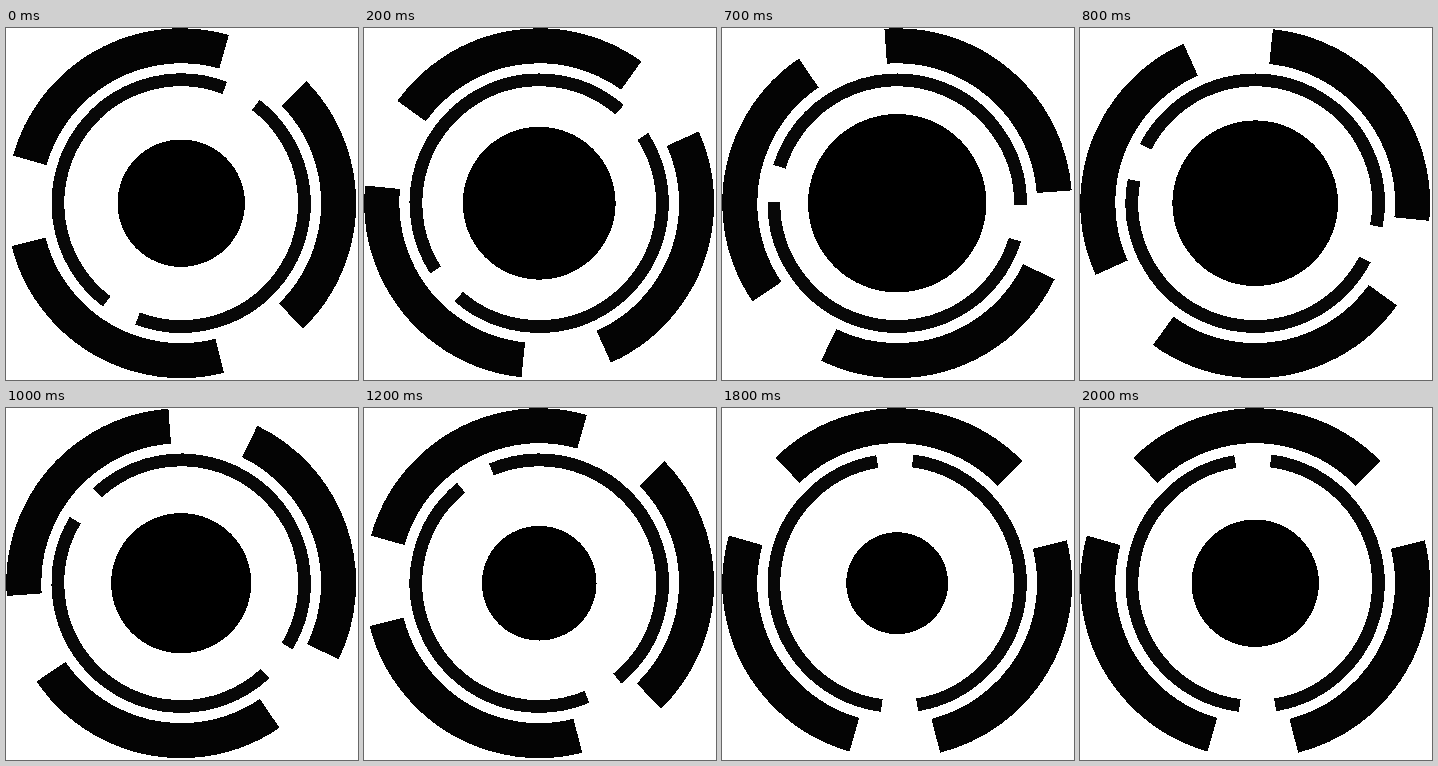
An HTML page that plays this animation: 352x352 px, repeating every 2100 ms.

```html
<!DOCTYPE html>
<html lang="en">
<head>
<meta charset="utf-8">
<title>Rotating rings</title>
<style>
html, body { margin: 0; width: 100%; height: 100%; overflow: hidden; background: #fff; }
svg { display: block; width: 100vw; height: 100vh; shape-rendering: crispEdges; }
</style>
</head>
<body>
<svg viewBox="0 0 352 352">
  <g transform="translate(175.2 175.2)">
    <g id="rings" fill="none">
      <circle r="157.4" stroke="#040404" stroke-width="35" pathLength="360" stroke-dasharray="90 30" transform="rotate(-14.2)"/>
      <circle r="123.3" stroke="#080808" stroke-width="12.8" pathLength="360" stroke-dasharray="163.5 16.5" transform="rotate(-82.8)"/>
    </g>
    <circle id="disc"/>
  </g>
</svg>
<script>
const STEP = 100, STEPS = 21;
const MIN = 38.2, GROW = 6.375;
const rings = document.getElementById('rings');
const disc = document.getElementById('disc');

// The disc grows and shrinks in even steps, resting one step at each end.
function radius(n) {
  if (n <= 5) return MIN + GROW * (n + 4);
  return MIN + GROW * (n <= 15 ? 15 - n : n - 16);
}

function draw() {
  const n = Math.floor(performance.now() / STEP) % STEPS;
  // The rings turn 10 degrees per step, then stand still until the loop restarts.
  rings.setAttribute('transform', `rotate(${10 * Math.min(n, 15) - 150})`);
  disc.setAttribute('r', radius(n));
  requestAnimationFrame(draw);
}
draw();
</script>
</body>
</html>
```
